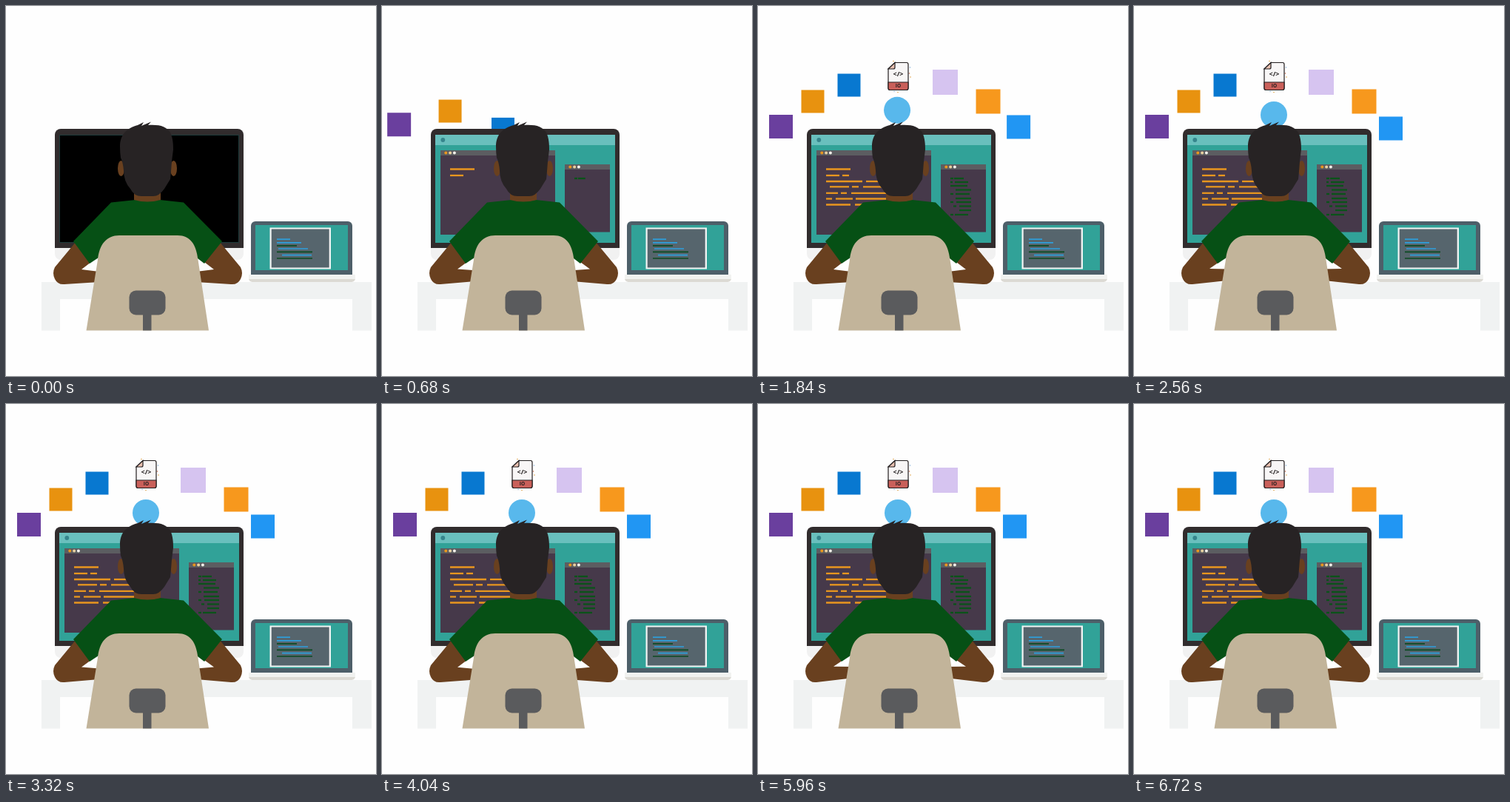
An HTML page with a canvas that plays this animation: 500x500 px, repeating every 6.76 s.

```html
<!DOCTYPE html>
<html lang="en">
<head>
<meta charset="utf-8">
<title>Developer at a desk</title>
<style>
html, body { margin: 0; width: 100%; height: 100%; overflow: hidden; background: #fefefe; }
canvas { display: block; width: 500px; height: 500px; }
</style>
</head>
<body>
<canvas id="stage"></canvas>
<script>
const LOOP = 6760;
const canvas = document.getElementById('stage');
const ctx = canvas.getContext('2d');
const dpr = window.devicePixelRatio || 1;
canvas.width = canvas.height = 500 * dpr;

const TEAL = '#31a298', DARK = '#312c2d', SKIN = '#69401f', GREEN = '#065015';
const ORANGE = '#e8961e', BLUE = '#2e9fdc';

const clamp = v => Math.max(0, Math.min(1, v));
const span = (t, start, length) => clamp((t - start) / length);
const easeOut = u => 1 - (1 - u) ** 3;
const backOut = u => 1 + 2.70158 * (u - 1) ** 3 + 1.70158 * (u - 1) ** 2;

function rect(x, y, w, h, color, r = 0) {
  ctx.fillStyle = color;
  ctx.beginPath();
  ctx.roundRect(x, y, w, h, r);
  ctx.fill();
}

function disc(x, y, r, color, ry = r) {
  ctx.fillStyle = color;
  ctx.beginPath();
  ctx.ellipse(x, y, r, ry, 0, 0, Math.PI * 2);
  ctx.fill();
}

function shape(d, color, stroke) {
  const path = new Path2D(d);
  ctx.fillStyle = color;
  ctx.fill(path);
  if (stroke) {
    ctx.strokeStyle = stroke;
    ctx.lineWidth = 1.2;
    ctx.stroke(path);
  }
}

function label(text, x, y, size, color) {
  ctx.fillStyle = color;
  ctx.font = `bold ${size}px "Open Sans", sans-serif`;
  ctx.textAlign = 'center';
  ctx.textBaseline = 'middle';
  ctx.fillText(text, x, y);
}

// Rows are [y, from, to, from, to, ...]; progress types them from the top.
function codeLines(rows, color, progress, thick = 2.3) {
  rows.forEach(([y, ...ends], i) => {
    const p = clamp(progress * rows.length - i);
    if (!p) return;
    const first = ends[0], limit = first + (ends[ends.length - 1] - first) * p;
    for (let k = 0; k < ends.length; k += 2) {
      const w = Math.min(ends[k + 1], limit) - ends[k];
      if (w > 0) rect(ends[k], y - thick / 2, w, thick, color);
    }
  });
}

const leftCode = [
  [220.5, 92, 125],
  [229, 92, 110, 114, 123],
  [237, 92, 141, 146, 178],
  [244.3, 97, 123, 127, 136, 142, 182],
  [252.8, 92, 108, 112, 120, 126, 182],
  [260.5, 92, 100, 105, 128, 132, 182],
  [268.5, 92, 125, 131, 182]
];
const rightCode = [
  [233, 260, 264, 265, 278], [238, 260, 263, 266, 284],
  [243, 260, 283], [248.5, 267, 288],
  [254, 260, 264, 267, 286], [260, 267, 288],
  [265, 260, 264, 268, 288], [270.5, 264, 268, 272, 288],
  [276, 272, 288], [282, 260, 264, 266, 284]
];

function scriptFile(x, y) {
  ctx.save();
  ctx.translate(x - 189.5, y - 95);
  for (const [dx, dy, c] of [[183, 74.5, '#e0a040'], [205.5, 83, '#8ab4d8'], [206, 96, '#e0a040'],
    [204.5, 91, '#d07050'], [184, 115.5, '#8ab4d8'], [189, 116.5, '#e0a040']]) disc(dx, dy, .8, c);
  shape('M185 76.5H201Q203 76.5 203 79V111Q203 113.5 200.5 113.5H178.5Q176 113.5 176 111V85Z', '#f8f6f6', '#231f20');
  shape('M176 103H203V111Q203 113.5 200.5 113.5H178.5Q176 113.5 176 111Z', '#c9605a', '#231f20');
  shape('M185 76.5V83Q185 85 183 85H176Z', '#e8c0b0', '#231f20');
  label('</>', 189.5, 93, 9, '#231f20');
  label('IO', 189.5, 108.5, 6.5, '#231f20');
  ctx.restore();
}

const tile = (size, color) => (x, y) => rect(x - size / 2, y - size / 2, size, size, color);
const icons = [
  [31, 163, tile(32, '#6a3f9e')],
  [74, 129, tile(31, '#e8920f')],
  [123, 107, tile(31, '#0878d0')],
  [189.5, 95, scriptFile],
  [253, 103, tile(34, '#d6c4f0')],
  [311, 129, tile(33, '#f7981d')],
  [347, 165.5, tile(32, '#2196f3')],
  [189, 147, (x, y) => disc(x, y, 18, '#58b8ec')]
];

function drawIcons(t) {
  icons.forEach(([x, y, draw], i) => {
    const u = span(t, 310 + i * 133, 880);
    if (!u) return;
    const f = backOut(u);
    draw(200 + (x - 200) * f, 220 + (y - 220) * f);
  });
}

function codeWindow(t, start, x, y, w, h, rows, color, type) {
  const p = easeOut(span(t, start, 260));
  if (!p) return;
  ctx.save();
  ctx.translate(x + w / 2, y + h / 2);
  ctx.scale(p, p);
  ctx.translate(-x - w / 2, -y - h / 2);
  rect(x, y, w, h, '#46394a');
  rect(x, y, w, 7, '#5c5d61');
  [ORANGE, '#e8d0a0', '#f2f0ea'].forEach((c, i) => disc(x + 7.3 + i * 5.8, y + 3.5, 2, c));
  codeLines(rows, color, span(t, type, 500));
  ctx.restore();
}

function monitor(t) {
  rect(66, 318, 255, 25, '#f1f1f1', 8);
  rect(66, 166, 255, 161, DARK, [8, 8, 0, 0]);
  rect(72, 174, 243, 146, '#1d3a3a');
  rect(73, 175, 241, 144, '#000');
  ctx.save();
  ctx.globalAlpha = span(t, 80, 280);
  rect(72, 174, 243, 146, TEAL);
  rect(72, 174, 243, 14, '#69bfbd');
  disc(82.3, 181, 2.9, '#35858c');
  ctx.restore();
  codeWindow(t, 300, 79, 195, 155, 114, leftCode, ORANGE, 560);
  codeWindow(t, 420, 247, 214, 61, 91.5, rightCode, '#0a5319', 640);
}

function desk() {
  const c = '#f0f2f2';
  rect(48, 373, 446, 23, c);
  rect(48, 373, 25, 65.5, c);
  rect(468, 373, 26, 65.5, c);
}

function laptop() {
  rect(331, 291, 137, 76, '#4d5f69', [6, 6, 0, 0]);
  rect(337, 296, 125, 61, TEAL);
  rect(356.5, 299.5, 82.5, 56, '#f2f4f4');
  rect(358.7, 301.5, 78, 52, '#56656d');
  codeLines([[315.2, 366, 384], [319.8, 366, 399], [328, 368, 408], [336.7, 373, 413]], BLUE, 1, 1.7);
  codeLines([[324, 366, 393], [332.4, 366, 414], [341, 366, 414]], '#0b4a20', 1, 1.7);
  rect(328, 363, 144, 10, '#dcdad4', [0, 0, 5, 5]);
  rect(328, 363, 144, 6, '#f1f2f0');
}

function arm(lift) {
  const hi = 359 - lift * 1.6, lo = 373 - lift;
  shape(`M95 318L66 353Q62 361 66 369Q70 377 79 376L126 ${lo}V${hi}L102 ${356 - lift / 2}L115 346Z`, SKIN);
}

function person(t) {
  const lift = 1.4 - 1.4 * Math.cos(t / LOOP * 22 * Math.PI * 2);
  arm(lift);
  ctx.save();
  ctx.translate(383, 0);
  ctx.scale(-1, 1);
  arm(lift);
  ctx.restore();

  shape('M142 265.5L175 262Q191 266 208 262L240 265.5L292 318L268 348L255 338V400H128V338L113 348L91 318Z', GREEN);
  shape('M173 240H209V262Q191 267 173 262Z', SKIN);
  disc(155.5, 219.5, 4.5, SKIN, 10.5);
  disc(226.5, 219.5, 4.5, SKIN, 10.5);
  shape('M154 190C154 174 163 165 178 161L186 157L183 162L196 156.5L192 161' +
    'C208 160 217 163 222 171C226 179 226 189 226 194L224 210Q223 224 222 234' +
    'L214 247Q207 257 199 257H183Q173 257 168 247Q159 237 159 222Q158 211 155 205Q154 198 154 190Z', '#272324');
}

function chair() {
  shape('M108.5 438.5L124 343C126 322 136 310 153 310H232C249 310 257 322 259.5 343L274 438.5Z', '#c2b49a');
  rect(185, 412, 11.5, 26.5, '#5a5b5d');
  rect(166.5, 384.5, 49, 33, '#5a5b5d', 9);
}

function draw(t) {
  ctx.setTransform(dpr, 0, 0, dpr, 0, 0);
  rect(0, 0, 500, 500, '#fefefe');
  drawIcons(t);
  monitor(t);
  desk();
  laptop();
  person(t);
  chair();
}

const begin = performance.now();
function tick() {
  draw((performance.now() - begin) % LOOP);
  requestAnimationFrame(tick);
}
tick();
</script>
</body>
</html>
```
